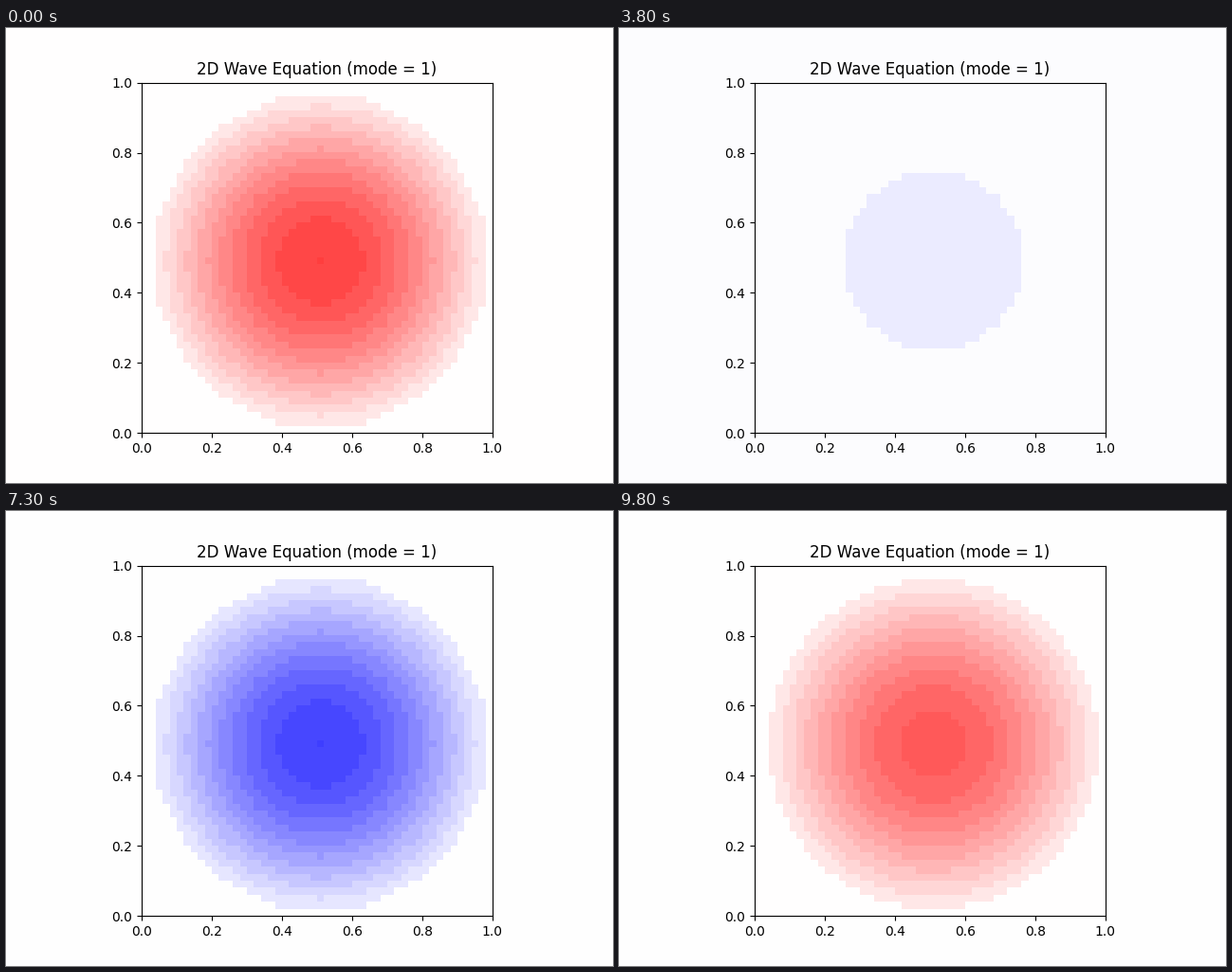
Recreate the animation shown at these times as a matplotlib script. Size 640 by 480 pixels, loop 9.9 s.

```python
import numpy as np
import matplotlib.pyplot as plt
from matplotlib.animation import FuncAnimation

N = 50                # grid cells per side
FRAMES = 99
PERIOD = 100          # frames in one oscillation
PEAK = 11.5           # frame position of the first crest
CELL_AREA = (369.6 / N) ** 2
MARGIN_AREA = 640 * 480 - 369.6 ** 2


def drum_mode(steps=8000):
    """Lowest eigenmode of the discrete Laplacian on a disc, by relaxation."""
    rows, cols = np.indices((N, N)) - N // 2
    dist2 = rows ** 2 + cols ** 2
    inside = dist2 <= (N // 2) ** 2
    grid = np.zeros((N + 2, N + 2))
    core = grid[1:-1, 1:-1]
    core[:] = np.cos(np.pi * np.sqrt(dist2) / N) * inside
    for _ in range(steps):
        neighbours = grid[:-2, 1:-1] + grid[2:, 1:-1] + grid[1:-1, :-2] + grid[1:-1, 2:]
        core[:] = inside * (4 * core + neighbours) / 8
    return core / core.max()


def banded_colors(values):
    """Colour the field, then average the colours inside each green band."""
    rgb = plt.cm.bwr(values / 2 + 0.5, bytes=True)[..., :3].astype(float)
    bands = rgb[..., 1].astype(int) // 16
    out = np.empty(rgb.shape, np.uint8)
    backdrop = None
    for band in np.unique(bands):
        members = bands == band
        total = rgb[members].sum(axis=0) * CELL_AREA
        area = members.sum() * CELL_AREA
        if band == 15:    # the lightest band also holds the white margin
            total = total + 255 * MARGIN_AREA
            area += MARGIN_AREA
            backdrop = np.floor(total / area)
        out[members] = np.floor(total / area + 1e-9)
    return out, backdrop


mode = drum_mode()

fig, ax = plt.subplots(figsize=(6.4, 4.8), dpi=100)
image = ax.imshow(np.zeros((N, N, 3), np.uint8), extent=(0, 1, 0, 1),
                  interpolation="nearest")
ax.set_title("2D Wave Equation (mode = 1)")


def update(frame):
    amplitude = np.cos(2 * np.pi * (frame - PEAK) / PERIOD)
    colors, backdrop = banded_colors(amplitude * mode)
    image.set_data(colors)
    fig.set_facecolor(backdrop / 255)
    return [image]


anim = FuncAnimation(fig, update, frames=FRAMES, interval=100,
                     repeat=True, repeat_delay=0, blit=False)
plt.show()
```
